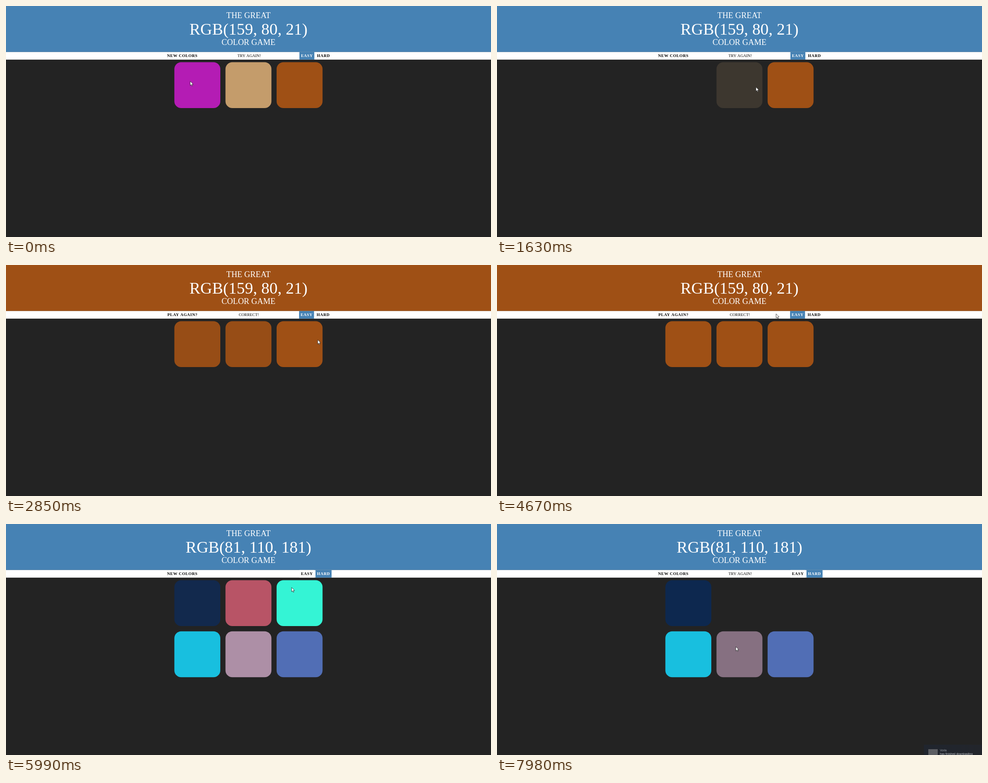
Write an HTML page with a canvas that moves like this. It is 1084 by 516 pixels and loops after 8 s.

```html
<!DOCTYPE html>
<html lang="en">
<head>
<meta charset="utf-8">
<title>Color Game</title>
<style>
  html, body { margin: 0; width: 100%; height: 100%; overflow: hidden; background: #232323; }
  canvas { display: block; }
</style>
</head>
<body>
<canvas id="stage" width="1084" height="516"></canvas>
<script>
const ctx = document.getElementById('stage').getContext('2d');
const rgb = hex => hex.match(/\w\w/g).map(h => parseInt(h, 16));
const css = c => `rgb(${c.map(Math.round)})`;
const clamp = v => Math.min(1, Math.max(0, v));
const blend = (a, b, k) => a.map((v, i) => v + (b[i] - v) * k);

const LOOP = 8000, TICK = 136.5, FADE = 600;
const [BG, WHITE, BLACK, STEEL] = ['232323', 'ffffff', '000000', '4682b4'].map(rgb);
const SERIF = '"Liberation Serif", "Times New Roman", serif';
const SANS = '"Liberation Sans", Arial, sans-serif';

// The last colour of a round is the one to find
const EASY = ['b41cb4', 'c49c6b', '9f5015'].map(rgb);
const HARD = ['0d284f', 'b95469', '30fadc', '18bfdf', 'ad8fa6', '516eb5'].map(rgb);

const CLICKS = [
  { at: 0, x: 412, y: 168, tile: 0 },
  { at: 1315, x: 579, y: 181, tile: 1 },
  { at: 2450, x: 697, y: 167, tile: 2 },
  { at: 4850, x: 624, y: 109 },
  { at: 5550, x: 706, y: 110, round: HARD },
  { at: 6460, x: 572, y: 173, tile: 1 },
  { at: 7020, x: 640, y: 195, tile: 2 },
  { at: 7800, x: 534, y: 274, tile: 4 }
];
const RESET = CLICKS.find(c => c.round).at;

// CSS "ease": cubic-bezier(.25, .1, .25, 1)
function ease(x) {
  x = clamp(x);
  let lo = 0, hi = 1;
  for (let i = 0; i < 20; i++) {
    const s = (lo + hi) / 2;
    if (.75 * s * (1 - s) + s ** 3 < x) lo = s; else hi = s;
  }
  return .3 * lo * (1 - lo) ** 2 + 3 * lo * lo * (1 - lo) + lo ** 3;
}

// Play all clicks up to time t
function replay(t) {
  let round = EASY, colors = [...EASY], won = false, message = '';
  for (const click of CLICKS.filter(c => c.at <= t)) {
    const k = ease((t - click.at) / FADE);
    const paint = (i, next) => { colors[i] = blend(colors[i] ?? next, next, k); };
    if (click.round) {
      round = click.round;
      round.forEach((c, i) => paint(i, c));
      won = false;
      message = '';
    } else if (click.tile === round.length - 1) {
      round.forEach((_, i) => paint(i, round.at(-1)));
      won = true;
      message = 'CORRECT!';
    } else if (click.tile !== undefined) {
      paint(click.tile, BG);
      message = 'TRY AGAIN!';
    }
  }
  return { colors, won, message, goal: round.at(-1) };
}

// The pointer rests around each click and glides in between
function pointerAt(t, rest = 200, glide = 600) {
  let pos = [CLICKS[0].x, CLICKS[0].y];
  CLICKS.slice(1).forEach(({ at, x, y }, i) => {
    const end = at - rest;
    const begin = Math.max(CLICKS[i].at + rest, end - glide);
    const k = clamp((t - begin) / (end - begin));
    pos = blend(pos, [x, y], k * k * (3 - 2 * k));
  });
  return pos;
}

function rect(x, y, w, h, color) {
  ctx.fillStyle = color;
  ctx.fillRect(x, y, w, h);
}

function text(str, x, y, font, color, align = 'left', spacing = 0) {
  ctx.font = font;
  ctx.fillStyle = color;
  ctx.textAlign = align;
  ctx.letterSpacing = spacing + 'px';
  ctx.fillText(str, x, y);
}

function button(label, x, width, active) {
  if (active) rect(x, 102.8, width, 17, css(blend(WHITE, STEEL, active)));
  text(label, x + 3.4, 114, `bold 9.14px ${SERIF}`, css(blend(BLACK, WHITE, active)), 'left', .571);
}

function drawHeader({ won, goal }) {
  rect(0, 0, 1084, 102.8, css(won ? goal : STEEL));
  text('THE GREAT', 542, 27.2, `18.29px ${SERIF}`, '#fff', 'center');
  text(`RGB(${goal.join(', ')})`, 542, 63.5, `36.57px ${SERIF}`, '#fff', 'center');
  text('COLOR GAME', 542, 87.4, `18.29px ${SERIF}`, '#fff', 'center');
}

function drawStrip({ won, message }, t) {
  rect(0, 102.8, 1084, 17, '#fff');
  const shift = won ? .75 : 0;
  button(won ? 'PLAY AGAIN?' : 'NEW COLORS', 356.5 + shift, 75, 0);
  text(message, 543.5 - shift, 114, `9.14px ${SERIF}`, '#000', 'center');
  button('EASY', 655.8 - shift, 33.4, 1 - ease((t - RESET) / 300));
  button('HARD', 691.7 - shift, 36, ease((t - RESET + 300) / 300));
}

function drawTiles({ colors }) {
  const pitch = 114.25, size = 102.7;
  colors.forEach((color, i) => {
    ctx.fillStyle = css(color);
    ctx.beginPath();
    ctx.roundRect(376.3 + i % 3 * pitch, 125.4 + Math.floor(i / 3) * pitch, size, size, size * .15);
    ctx.fill();
  });
}

function drawToast(t) {
  const y = 516 - 23 * clamp((t - 7700) / 200);
  if (y >= 516) return;
  const shade = ctx.createLinearGradient(954, 0, 1084, 0);
  shade.addColorStop(0, '#20252e');
  shade.addColorStop(1, '#22252b');
  rect(954, y, 130, 40, shade);
  rect(964, y + 10, 21, 21, '#5c5e63');
  text('Vorla', 990, y + 15, `6.5px ${SANS}`, '#9a9fa6');
  text('has finished downloading', 990, y + 22.8, `6.5px ${SANS}`, '#bfc3c8');
}

const ARROW = new Path2D('M.5 .5V16.5L4.2 13L6.7 18.7L9.2 17.6L6.8 12H11.8Z');

function drawPointer(t) {
  const [x, y] = pointerAt(t);
  ctx.save();
  ctx.translate(x - .6, y - .3);
  ctx.scale(.6, .6);
  ctx.fillStyle = '#fff';
  ctx.fill(ARROW);
  ctx.strokeStyle = '#111';
  ctx.lineWidth = 1.2;
  ctx.stroke(ARROW);
  ctx.restore();
}

function draw(now) {
  // The screen refreshes in even ticks
  const t = TICK * Math.floor(now % LOOP / TICK + .2);
  const game = replay(t);
  rect(0, 0, 1084, 516, css(BG));
  drawHeader(game);
  drawStrip(game, t);
  drawTiles(game);
  drawToast(t);
  drawPointer(t);
}

const start = performance.now();
function tick() {
  draw(performance.now() - start);
  requestAnimationFrame(tick);
}
tick();
</script>
</body>
</html>
```
